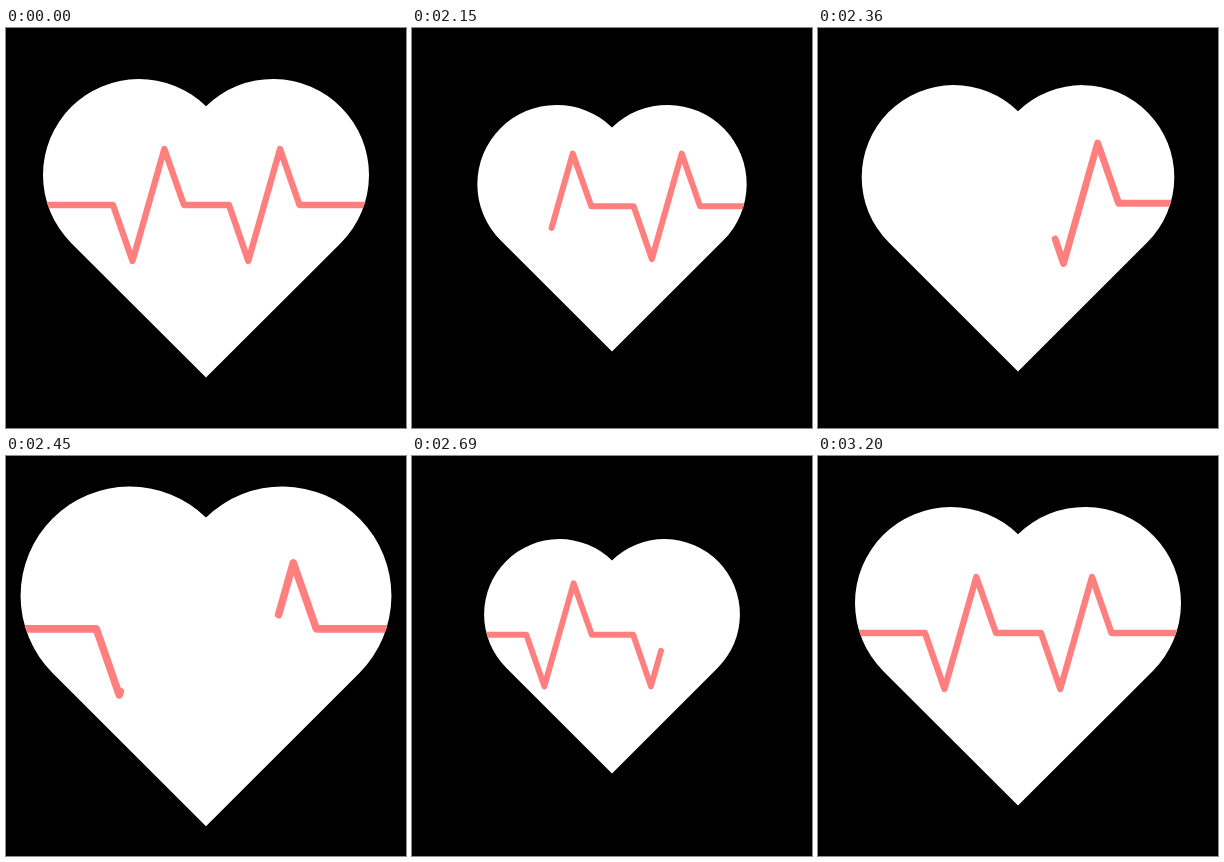
An HTML page with a canvas that plays this animation: 400 by 400 pixels, repeating every 3230 ms.

```html
<!DOCTYPE html>
<html lang="en">
<head>
<meta charset="utf-8">
<title>Heartbeat</title>
<style>
  html, body { margin: 0; width: 100%; height: 100%; overflow: hidden; background: #000; }
  canvas { display: block; width: 100vw; height: 100vh; }
</style>
</head>
<body>
<canvas></canvas>
<script>
const LOOP = 3230, START = 2030, STEP = 30;
const ERASE_SPEED = 1.055;
const DRAW_START = 2373, DRAW_TIME = 720;
const canvas = document.querySelector('canvas');
const ctx = canvas.getContext('2d');

// CSS-style cubic bezier, solved by bisection
function bezier(x1, y1, x2, y2) {
  const at = (a, b, u) => 3 * a * u * (1 - u) ** 2 + 3 * b * u * u * (1 - u) + u ** 3;
  return p => {
    let lo = 0, hi = 1;
    for (let i = 0; i < 24; i++) {
      const mid = (lo + hi) / 2;
      if (at(x1, x2, mid) < p) lo = mid; else hi = mid;
    }
    return at(y1, y2, lo);
  };
}
const ease = bezier(.25, .1, .25, 1);
const inOut = bezier(.42, 0, .58, 1);
const quadOut = p => 1 - (1 - p) ** 2;

// [time, scale, easing into this key]
const heartKeys = [[2030, 1], [2245, .71, inOut], [2455, 1.138, inOut], [2630, .76, inOut], [3200, 1, ease]];
const pulseKeys = [[2030, 1], [2235, .91, inOut], [2455, 1.18, inOut], [2700, .92, inOut], [3200, 1, ease]];

function scaleAt(keys, t) {
  if (t <= keys[0][0]) return keys[0][1];
  for (let i = 1; i < keys.length; i++) {
    const [t0, v0] = keys[i - 1], [t1, v1, fn] = keys[i];
    if (t < t1) return v0 + (v1 - v0) * fn((t - t0) / (t1 - t0));
  }
  return 1;
}

// Shapes are centred on the origin
const heart = new Path2D();
heart.moveTo(0, 149.6);
heart.lineTo(-134.9, 14.9);
heart.arc(-67, -53, 96, Math.PI * .75, -Math.acos(67 / 96));
heart.arc(67, -53, 96, Math.PI + Math.acos(67 / 96), Math.PI * .25);
heart.closePath();

const points = [[-163, -23], [-93, -23], [-73.5, 33], [-41.7, -79], [-22, -23],
  [23, -23], [42.3, 33], [74, -79], [93.5, -23], [163, -23]];
const pulse = new Path2D();
points.forEach(([x, y]) => pulse.lineTo(x, y));
const LENGTH = points.slice(1).reduce((sum, [x, y], i) =>
  sum + Math.hypot(x - points[i][0], y - points[i][1]), 0);

function strokePart(from, length) {
  ctx.setLineDash([length, LENGTH * 2]);
  ctx.lineDashOffset = -from;
  ctx.stroke(pulse);
}

function draw(t) {
  const unit = canvas.width / 400;
  ctx.setTransform(unit, 0, 0, unit, 0, 0);
  ctx.fillStyle = '#000';
  ctx.fillRect(0, 0, 400, 400);
  ctx.save();
  ctx.translate(200, 200);

  const size = scaleAt(heartKeys, t), pulseSize = scaleAt(pulseKeys, t);
  ctx.scale(size, size);
  ctx.fillStyle = '#fff';
  ctx.fill(heart);
  ctx.clip(heart);
  ctx.scale(pulseSize / size, pulseSize / size);

  ctx.strokeStyle = '#ff7f7f';
  ctx.lineWidth = 6.4;
  ctx.lineCap = ctx.lineJoin = 'round';

  const erased = t < START ? 0 : 37 + (t - START) * ERASE_SPEED;
  const progress = Math.min((t - DRAW_START) / DRAW_TIME, 1);
  if (progress > 0) strokePart(0, LENGTH * quadOut(progress));
  if (erased < LENGTH) {
    // the end of the old trace is cropped as it leaves
    if (LENGTH - erased < 90) {
      ctx.beginPath();
      ctx.rect(0, -34 / pulseSize, 200, 9 / pulseSize);
      ctx.clip();
    }
    strokePart(erased, LENGTH);
  }
  ctx.restore();
}

function resize() {
  const ratio = window.devicePixelRatio || 1;
  canvas.width = Math.round(innerWidth * ratio);
  canvas.height = Math.round(innerHeight * ratio);
}

const origin = performance.now();
function tick() {
  const t = Math.max(0, performance.now() - origin) % LOOP;
  draw(t < START ? 0 : START + Math.floor((t - START) / STEP) * STEP);
  requestAnimationFrame(tick);
}
addEventListener('resize', resize);
resize();
tick();
</script>
</body>
</html>
```
